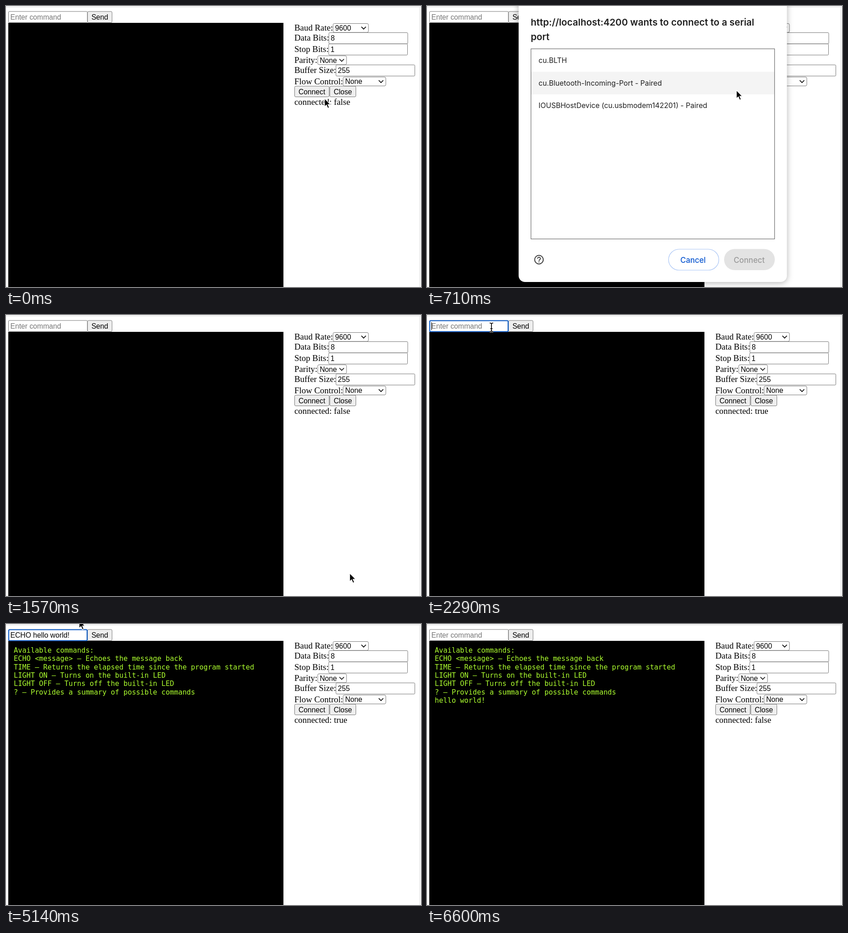
Write an HTML page that moves like this. It is 908 by 617 pixels and loops after 6770 ms.

```html
<!DOCTYPE html>
<html lang="en">
<head>
<meta charset="utf-8">
<title>Serial terminal</title>
<style>
  html, body { margin: 0; width: 100%; height: 100%; overflow: hidden; background: #fff; }
  svg { display: block; }
  text { white-space: pre; }
  .ui { font: 15.73px "Liberation Sans", Arial, sans-serif; }
  .label { font: 18.88px "Liberation Serif", Times, serif; }
  .term { font: 15.33px "DejaVu Sans Mono", monospace; fill: #adff2f; }
  .field { fill: #fff; stroke: #767676; }
  .button { fill: #efefef; stroke: #767676; }
  .button.down { fill: #f5f5f5; stroke: #8d8d8d; }
  .mid { text-anchor: middle; }
  .chevron { fill: none; stroke: #111; stroke-width: 1.7; }
  .title { font: 600 20.5px Inter, sans-serif; fill: #1f1f1f; }
  .row { font: 15.7px Inter, sans-serif; fill: #1f1f1f; }
  .pill { font: 500 16.8px Inter, sans-serif; text-anchor: middle; }
  #dialog { filter: drop-shadow(0 2px 7px rgba(0, 0, 0, .3)); }
</style>
</head>
<body>
<svg width="908" height="617" viewBox="0 0 908 617">
  <path d="M0 2H908M905.5 2V617" stroke="#e4e4e4" stroke-width="1.5"/>
  <rect x="5" y="37" width="602" height="580"/>
  <g id="form"></g>
  <rect id="ring" x="6" y="12.5" width="171.5" height="24" rx="2" fill="none" stroke="#0f5fcb" stroke-width="2.2"/>
  <text id="entry" class="ui" x="9.5" y="29.5"></text>
  <path id="caret" d="M0 16V33" stroke="#000" stroke-width="1.2"/>
  <g id="output" class="term"></g>
  <text id="status" class="label" x="631" y="217"></text>

  <g id="dialog">
    <rect x="200.5" y="-20" width="587" height="626" rx="14" fill="#fff"/>
  </g>
  <g id="dialogBody">
    <text class="title" x="227" y="43">http://localhost:4200 wants to connect to a serial</text>
    <text class="title" x="227" y="75">port</text>
    <rect x="228" y="144.5" width="532" height="49.5" fill="#f4f4f4"/>
    <rect id="picked" x="228" y="194" width="532" height="49.5" fill="#d3e3fd"/>
    <rect x="227.5" y="94" width="533" height="417.5" fill="none" stroke="#6b6b6b" stroke-width="1.2"/>
    <text class="row" x="244" y="124.5">cu.BLTH</text>
    <text class="row" x="244" y="174.5">cu.Bluetooth-Incoming-Port - Paired</text>
    <text class="row" x="244" y="224">IOUSBHostDevice (cu.usbmodem142201) - Paired</text>
    <circle cx="245" cy="557" r="9.4" fill="none" stroke="#3c3c3c" stroke-width="2"/>
    <path d="M242 554.7a3 3 0 1 1 4.7 2.4q-1.7 1.1-1.7 2.6M245 561v2" fill="none" stroke="#3c3c3c" stroke-width="1.9"/>
    <rect x="528.5" y="534" width="110" height="46" rx="23" fill="#fff" stroke="#a8c4f5" stroke-width="1.2"/>
    <text class="pill" x="582" y="563.5" fill="#0b57d0">Cancel</text>
    <rect id="pair" x="650" y="533.5" width="111" height="46.5" rx="23.2"/>
    <text id="pairText" class="pill" x="705" y="563.5">Connect</text>
  </g>

  <path id="arrow" d="M0 0V18.2L4.1 14.4L7.1 21.3L10.2 20L7.3 13.2H13Z" stroke="#fff" stroke-width="1.3"/>
  <g id="beam" fill="none">
    <path d="M-4-9.5Q0-9.5 0-7Q0-9.5 4-9.5M0-7V7M-4 9.5Q0 9.5 0 7Q0 9.5 4 9.5M-2.5 3H2.5" stroke="#fff" stroke-width="3.4"/>
    <path d="M-4-9.5Q0-9.5 0-7Q0-9.5 4-9.5M0-7V7M-4 9.5Q0 9.5 0 7Q0 9.5 4 9.5M-2.5 3H2.5" stroke="#000" stroke-width="1.7"/>
  </g>
</svg>
<script>
const LOOP = 6770;
const $ = id => document.getElementById(id);

function add(parent, tag, attrs, text) {
  const el = document.createElementNS('http://www.w3.org/2000/svg', tag);
  for (const key in attrs) el.setAttribute(key, attrs[key]);
  if (text) el.textContent = text;
  return parent.appendChild(el);
}

const form = $('form');
const label = (y, text) => add(form, 'text', { class: 'label', x: 631, y }, text);

function box(cls, x, y, width, height, rx) {
  return add(form, 'rect', { class: cls, x, y, width, height, rx });
}
function field(x, y, width, value) {
  box('field', x, y, width, 24.5, 2);
  add(form, 'text', { class: 'ui', x: x + 4, y: y + 17.5 }, value);
}
function select(x, y, width, value) {
  box('field', x, y, width, 19.5, 3);
  add(form, 'text', { class: 'ui', x: x + 4.5, y: y + 15.3 }, value);
  add(form, 'path', { class: 'chevron', d: `M${x + width - 15.5} ${y + 7.2}l5 5l5-5` });
}
function button(x, y, width, height, text) {
  const rect = box('button', x, y, width, height, 2.5);
  add(form, 'text', { class: 'ui mid', x: x + width / 2, y: y + 17.5 }, text);
  return rect;
}

field(5.5, 12, 172.5, '');
label(54, 'Baud Rate:');
select(715.5, 38.5, 77.5, '9600');
label(76, 'Data Bits:');
field(706.5, 58.5, 172.5, '8');
label(101, 'Stop Bits:');
field(706, 83.2, 172.5, '1');
label(124.5, 'Parity:');
select(682, 109.3, 63, 'None');
label(147, 'Buffer Size:');
field(722, 129.3, 172.5, '255');
label(171.5, 'Flow Control:');
select(737.5, 156, 93.5, 'None');
const buttons = {
  send: button(178.5, 12, 53.5, 24.5, 'Send'),
  connect: button(631.5, 176, 75.5, 23.5, 'Connect'),
  close: button(708.5, 176, 57, 23.5, 'Close')
};

const lines = [
  'Available commands:',
  'ECHO <message> – Echoes the message back',
  'TIME – Returns the elapsed time since the program started',
  'LIGHT ON – Turns on the built-in LED',
  'LIGHT OFF – Turns off the built-in LED',
  '? – Provides a summary of possible commands',
  'hello world!'
].map((text, i) => add($('output'), 'text', { x: 17, y: 63 + i * 18.33 }, text));

// Each step changes only the listed parts of the state.
const steps = [
  [0, { arrow: [697, 203], beam: null, entry: '', focus: false, caret: false, lines: 0,
        online: false, dialog: false, picked: false, down: null }],
  [140, { arrow: [694, 201] }],
  [290, { arrow: [683, 191] }],
  [430, { arrow: [677, 185], down: 'connect' }],
  [710, { dialog: true, down: null }],
  [860, { arrow: [660, 202] }],
  [1000, { arrow: [620, 230] }],
  [1140, { arrow: [612, 237], picked: true }],
  [1290, { arrow: [690, 430] }],
  [1430, { arrow: [751, 570] }],
  [1570, { arrow: [752, 567], dialog: false }],
  [1710, { arrow: [758, 536] }],
  [1860, { arrow: [630, 370], online: true }],
  [2000, { arrow: [360, 150] }],
  [2140, { arrow: null, beam: [165, 31] }],
  [2290, { beam: [141, 27], focus: true, caret: true }],
  [2720, { beam: null }],
  [2860, { entry: '?' }],
  [3000, { entry: '' }],
  [3140, { lines: 6 }],
  [3290, { caret: false }],
  [3570, { entry: 'E', caret: true }],
  [3710, { entry: 'EC' }],
  [3860, { entry: 'ECHO' }],
  [4000, { entry: 'ECHO ' }],
  [4290, { entry: 'ECHO he' }],
  [4430, { entry: 'ECHO hell' }],
  [4570, { entry: 'ECHO hello w' }],
  [4720, { entry: 'ECHO hello wor' }],
  [4860, { entry: 'ECHO hello world!', caret: false }],
  [5140, { arrow: [160, -9] }],
  [5290, { arrow: [186, 9] }],
  [5430, { arrow: [202, 22], focus: false, down: 'send' }],
  [5570, { arrow: [203, 23], entry: '', down: null }],
  [5710, { arrow: [300, 60], lines: 7 }],
  [5860, { arrow: [520, 135] }],
  [6000, { arrow: [690, 184] }],
  [6140, { arrow: [728, 191] }],
  [6290, { arrow: [730, 191], down: 'close' }],
  [6430, { online: false, down: null }],
  [6600, { arrow: null }]
];

const show = (el, on) => { el.style.display = on ? '' : 'none'; };

function place(el, point) {
  show(el, point);
  if (point) el.setAttribute('transform', `translate(${point})`);
}

function draw(s) {
  place($('arrow'), s.arrow);
  place($('beam'), s.beam);
  const entry = $('entry');
  entry.textContent = s.entry;
  place($('caret'), s.caret && [10 + (s.entry ? entry.getComputedTextLength() : 0), 0]);
  entry.textContent = s.entry || 'Enter command';
  entry.setAttribute('fill', s.entry ? '#000' : '#757575');
  show($('ring'), s.focus);
  lines.forEach((line, i) => show(line, i < s.lines));
  $('status').textContent = `connected: ${s.online}`;
  show($('dialog'), s.dialog);
  show($('dialogBody'), s.dialog);
  show($('picked'), s.picked);
  $('pair').setAttribute('fill', s.picked ? '#0b57d0' : '#e3e3e3');
  $('pairText').setAttribute('fill', s.picked ? '#fff' : '#999');
  for (const name in buttons) buttons[name].classList.toggle('down', s.down === name);
}

let last = -1;
function tick() {
  const t = performance.now() % LOOP;
  const past = steps.filter(([at]) => at <= t);
  if (past.length !== last) {
    last = past.length;
    draw(Object.assign({}, ...past.map(([, change]) => change)));
  }
  requestAnimationFrame(tick);
}
tick();
</script>
</body>
</html>
```
